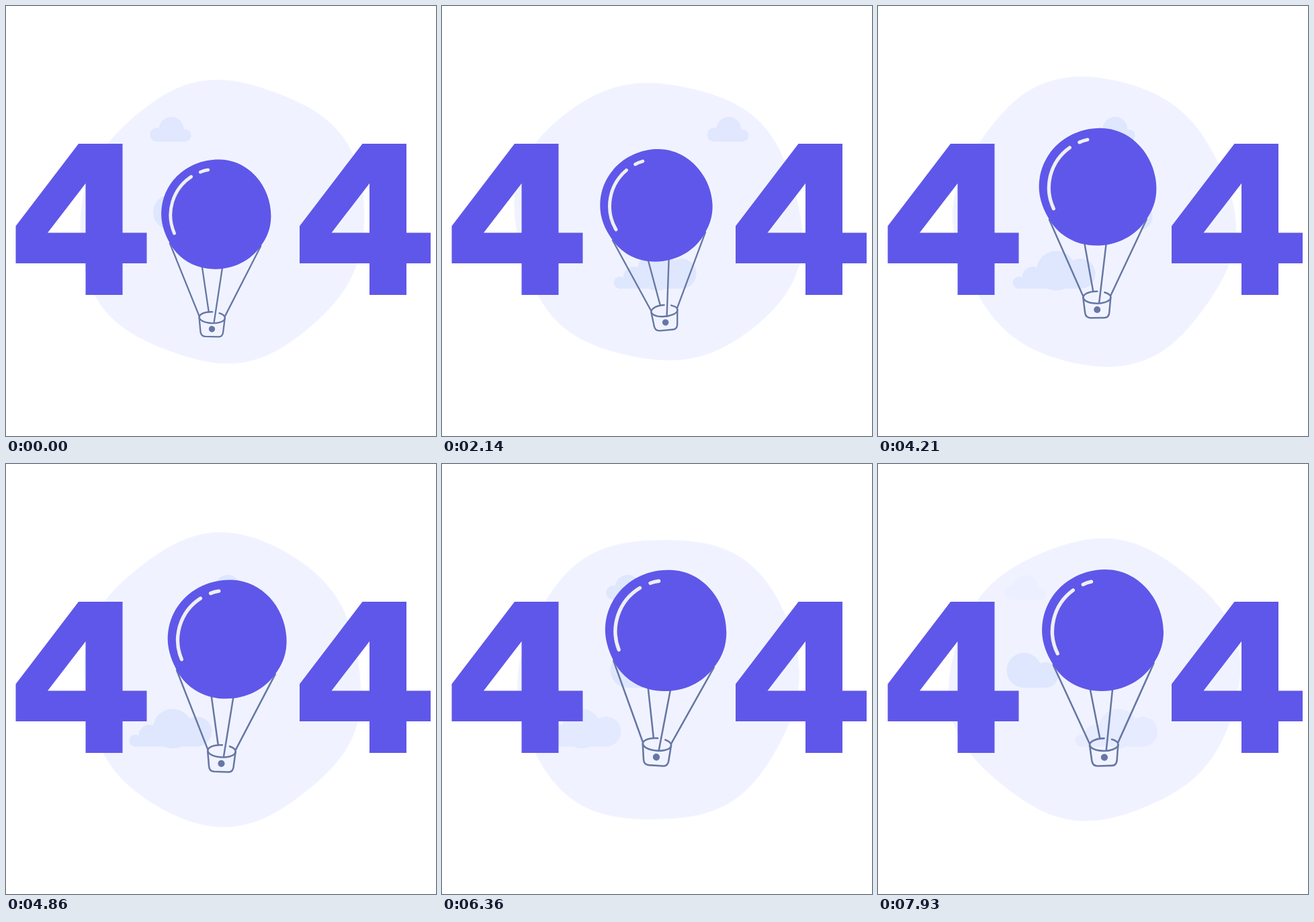
Recreate the animation shown at these times as an HTML page. Size 640 px wide and 640 px high, loop 8 s.

```html
<!DOCTYPE html>
<html lang="en">
<head>
<meta charset="utf-8">
<title>404</title>
<style>
  html, body { margin: 0; width: 100%; height: 100%; overflow: hidden; background: #fff; }
  svg { display: block; width: 100vw; height: 100vh; }
  .cloud { fill: #dfe7ff; }
  .solid { fill: #5f57e9; }
  .line { fill: none; stroke: #6677a6; stroke-width: 2.5; stroke-linecap: round; stroke-linejoin: round; }
  .shine { fill: none; stroke: #efeff4; stroke-width: 5.2; stroke-linecap: round; }
</style>
</head>
<body>
<svg viewBox="0 0 640 640" role="img" aria-label="404">
  <defs>
    <path id="four" class="solid" fill-rule="evenodd"
      d="M108 205H173.5V337.5H209.5V383H173.5V430H118.5V383H14.5V327.5Z M118.5 264L62 337.5H118.5Z"/>
  </defs>
  <path id="blob" fill="#f0f3ff"/>

  <g id="topCloud" class="cloud">
    <circle cx="1" cy="183.5" r="18.5"/><circle cx="-20.5" cy="191.5" r="10.5"/>
    <circle cx="21.5" cy="192.7" r="9.3"/><rect x="-20.5" y="190" width="42" height="12"/>
  </g>
  <g id="middleCloud" class="cloud">
    <circle cx="26" cy="307" r="26"/><circle cx="58" cy="314" r="19"/>
    <rect x="26" y="314" width="32" height="19"/>
  </g>
  <g id="bottomCloud" class="cloud">
    <circle cx="-114" cy="411.7" r="9"/><circle cx="-93" cy="404" r="16"/>
    <circle cx="-58.5" cy="394" r="29.5"/><circle cx="-22.3" cy="398.3" r="22.3"/>
    <rect x="-114" y="409" width="91.7" height="11.6"/>
  </g>

  <use href="#four"/>
  <use href="#four" x="422.5"/>

  <g id="balloon">
    <path class="line" d="M-72 49L-21 163M73 48L20 162M-19 86L-6 156M13 85L3 172"/>
    <path class="line" d="M0 155.7A20.5 9 0 1 0 11 157.2"/>
    <path class="line" d="M-21 165L-18 188Q-17 195-10 195.3L11 195Q17 195 18 188L20 165"/>
    <circle cx="0" cy="183" r="5" fill="#6677a6"/>
    <path class="solid" d="M4-87.5C51-87.5 87.5-45 87.5 3C87.5 22 81 36 73 48C57 73 29 87.5-2 87.5
      C-33 87.5-57 72-70 52C-79 38-87.5 20-87.5 0C-87.5-50-46-87.5 4-87.5Z"/>
    <path class="shine" d="M-42-58.3A73 73 0 0 0-65.5 32.7M-27.5-66.3Q-22-69-15.5-70.2"/>
  </g>
</svg>
<script>
const LOOP = 8000, CYCLE = 7200, FADE = 1080, CLOUD_LIFE = 7050;
const $ = id => document.getElementById(id);
const lerp = (a, b, k) => a + (b - a) * k;
const clamp = v => Math.max(0, Math.min(1, v));

// A circle with soft even waves, so half a turn brings it back to itself
function blobPath() {
  const wave = (angle, count, size, shift) => size * Math.cos(count * angle + shift);
  const points = Array.from({ length: 180 }, (_, i) => {
    const a = i * Math.PI / 90;
    const r = 210.8 + wave(a, 2, 4.9, 1.17) + wave(a, 4, 2.2, 1.43) + wave(a, 6, 2.6, -2.36);
    return [r * Math.cos(a), r * Math.sin(a)];
  });
  return `M${points.join('L')}Z`;
}

function drawBlob(t) {
  $('blob').setAttribute('transform', `translate(322 321) rotate(${180 * t / CYCLE})`);
}

// x is the place at the start of a drift, speed is in px per ms
function drawCloud(id, t, start, x, speed) {
  const age = (t - start + CYCLE) % CYCLE;
  $(id).setAttribute('transform', `translate(${x - speed * age} 0)`);
  $(id).setAttribute('opacity', clamp(Math.min(age, CLOUD_LIFE - age) / FADE));
}

function drawBalloon(t) {
  const rise = (1 - Math.cos(Math.PI * (t + 20) / CYCLE)) / 2;
  const swing = -4.6 * Math.sin(2 * Math.PI * (t - 550) / CYCLE);
  $('balloon').setAttribute('transform',
    `translate(${lerp(313.3, 334.9, rise)} ${lerp(310, 245.8, rise)}) ` +
    `rotate(${swing} 0 -14) scale(${lerp(0.934, 1.036, rise)})`);
}

function draw() {
  const t = performance.now() % LOOP;
  drawBlob(t);
  drawCloud('topCloud', t, 1150, 461.1, 0.0357);
  drawCloud('middleCloud', t, 2250, 405.5, 0.0377);
  drawCloud('bottomCloud', t, 100, 433, 0.0266);
  drawBalloon(t);
  requestAnimationFrame(draw);
}

$('blob').setAttribute('d', blobPath());
draw();
</script>
</body>
</html>
```
